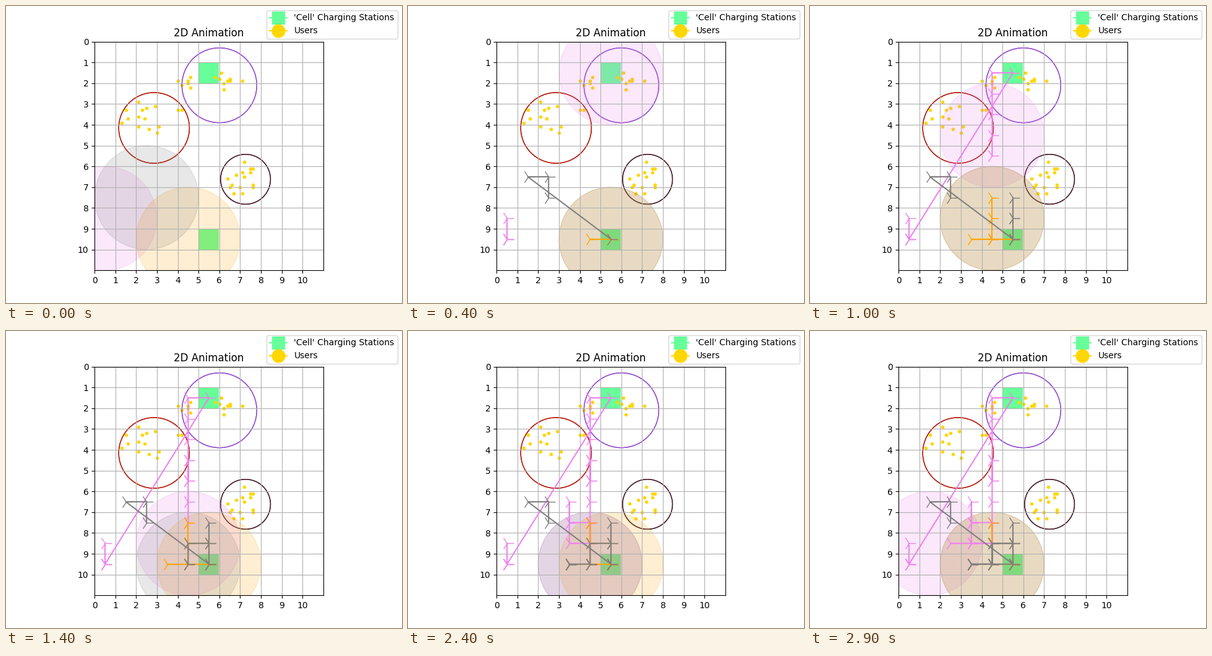
A matplotlib script that plays this animation: 640 px wide and 480 px high, repeating every 3000 ms.

```python
import matplotlib.pyplot as plt
import numpy as np
from matplotlib.animation import FuncAnimation
from matplotlib.patches import Circle, Rectangle

FRAMES, INTERVAL = 30, 100
STATION, USER = "#66ff99", "gold"
REACH = 2.5
USERS_PER_GROUP = 15

# Turning points of each drone: column, row and optional steps of waiting.
ROUTES = {
    "violet": [(0, 8), (0, 9, 2), (5, 1), (4, 1), (4, 5), (4, 4), (4, 8),
               (3, 8), (3, 6), (3, 7), (4, 7, 2), (4, 9, 2), (4, 8), (1, 8)],
    "orange": [(4, 9), (5, 9, 3), (3, 9), (4, 9), (4, 7), (4, 8), (5, 8),
               (5, 9, 16), (4, 9)],
    "gray": [(2, 7), (2, 6), (1, 6), (5, 9, 3), (5, 7), (5, 8), (4, 8),
             (4, 9, 3), (3, 9, 8), (4, 9), (4, 8), (5, 8), (5, 9), (4, 9, 1)],
}

# Ring centre, radius and colour, then centre and half-size of the crowd.
GROUPS = [
    ((6.0, 2.1), 1.8, "#9650d2", (5.6, 1.95), (1.6, 0.45)),
    ((2.86, 4.15), 1.7, "#b81c0c", (2.75, 3.65), (1.55, 0.85)),
    ((7.26, 6.62), 1.2, "#4b1e2a", (7.0, 6.55), (0.9, 0.95)),
]


def walk(turns):
    """Go cell by cell along rows and columns, jump straight otherwise."""
    cells = []
    for x, y, *wait in turns:
        stop = np.array([x, y])
        if cells:
            gap = stop - cells[-1]
            if gap.all():
                cells.append(stop)
            else:
                start, heading = cells[-1], np.sign(gap)
                cells += [start + k * heading
                          for k in range(1, abs(gap).max() + 1)]
        else:
            cells.append(stop)
        cells += [stop] * sum(wait)
    return np.array(cells) + 0.5


def crowd(rng, centre, half_size):
    """Users scattered over an ellipse, on a grid of tenths."""
    angle = rng.uniform(0, 2 * np.pi, USERS_PER_GROUP)
    dist = np.sqrt(rng.uniform(0, 1, USERS_PER_GROUP))
    unit = np.column_stack([np.cos(angle), np.sin(angle)]) * dist[:, None]
    return np.round(centre + unit * half_size, 1)


class Drone:
    """A coverage disc with the trail of cells it has left behind."""

    def __init__(self, ax, color, turns):
        self.path = walk(turns)
        self.disc = ax.add_patch(
            Circle(self.path[0], REACH, color=color, alpha=0.18))
        self.trail, = ax.plot([], [], color=color, marker="4", markersize=16)

    def move(self, step):
        self.disc.center = self.path[step]
        self.trail.set_data(*self.path[:step].T)
        return [self.disc, self.trail]


fig, ax = plt.subplots(figsize=(6.4, 4.8), dpi=100)
ax.set_aspect("equal")
ax.set_xlim(0, 11)
ax.set_ylim(11, 0)
ax.set_xticks(range(11))
ax.set_yticks(range(11))
ax.grid(True)
ax.set_title("2D Animation")

for corner in [(5, 1), (5, 9)]:
    ax.add_patch(Rectangle(corner, 0.97, 1, facecolor=STATION))

rng = np.random.default_rng(4)
for centre, radius, color, middle, half_size in GROUPS:
    ax.scatter(*crowd(rng, middle, half_size).T, color=USER, marker=".")
    for _ in range(2):  # doubled outline for a crisper edge
        ax.add_patch(Circle(centre, radius, fill=False, edgecolor=color))

drones = [Drone(ax, color, turns) for color, turns in ROUTES.items()]

handles = [
    ax.plot([], [], color=color, marker=marker, markersize=15, label=label)[0]
    for color, marker, label in [
        (STATION, "s", "'Cell' Charging Stations"), (USER, "o", "Users")]
]
fig.legend(handles=handles, loc="upper right")


def update(step):
    return [artist for drone in drones for artist in drone.move(step)]


anim = FuncAnimation(fig, update, frames=FRAMES, interval=INTERVAL,
                     repeat=True, repeat_delay=0, blit=False)
plt.show()
```
